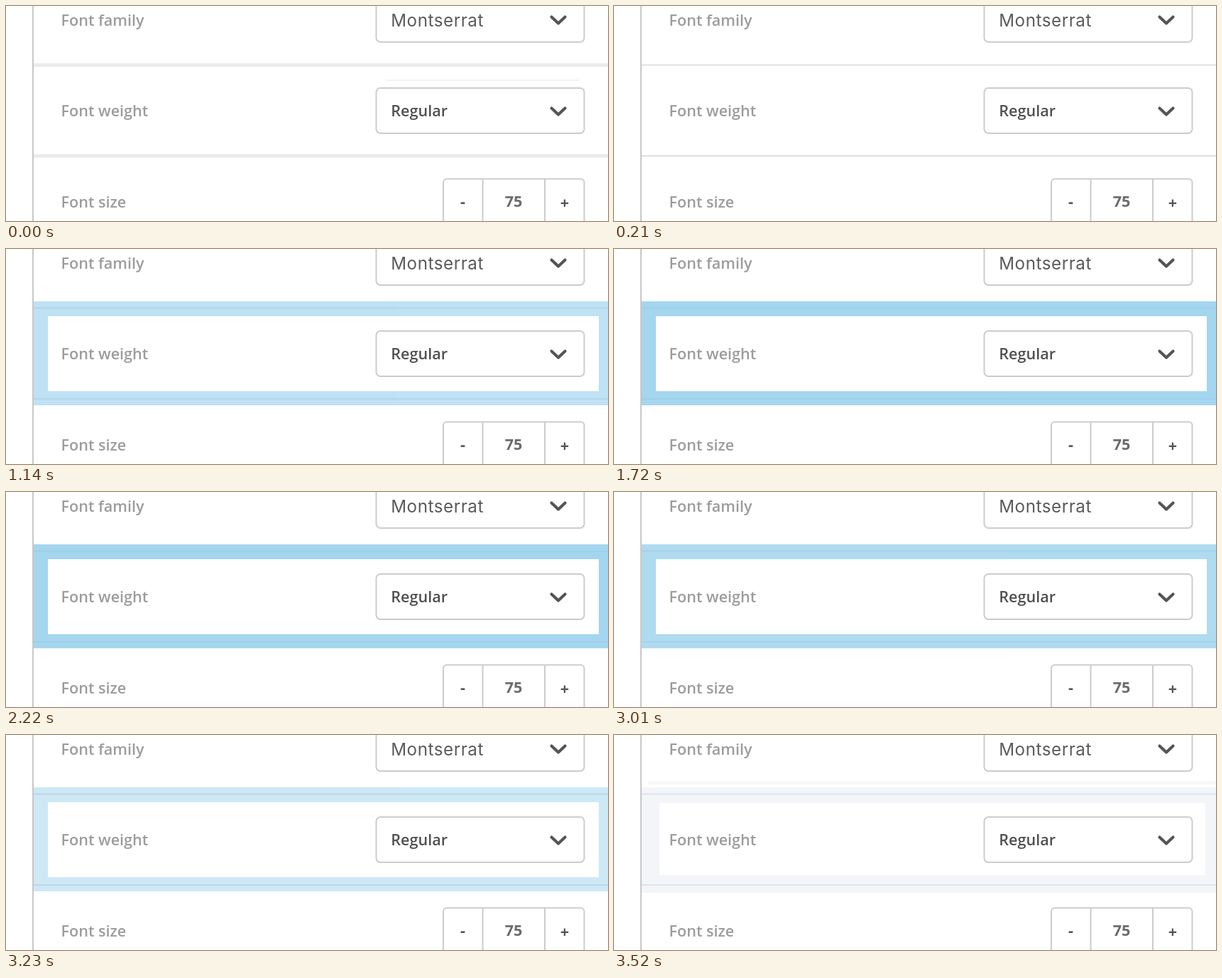
Animation, 848 px wide and 304 px high, one loop 3.9 s. Source, as an HTML page:

```html
<!DOCTYPE html>
<html lang="en">
<head>
<meta charset="utf-8">
<title>Font settings</title>
<style>
  html, body { margin: 0; width: 100%; height: 100%; overflow: hidden; background: #fff; }
  svg { display: block; width: 848px; height: 304px; }
  text { font: 600 21.6px "Open Sans", "Noto Sans", sans-serif; fill: #9c9c9c; }
  .value { fill: #505050; }
  .family { font: 400 24.2px Inter, sans-serif; letter-spacing: .55px; fill: #5a5a5a; }
  .number { font-weight: 700; fill: #6c6c6c; text-anchor: middle; }
  .sign { font-weight: 700; fill: #555; text-anchor: middle; }
  .box { fill: #fff; stroke: #ccc; stroke-width: 2; }
  .chevron { fill: none; stroke: #555; stroke-width: 4.2; stroke-linecap: round; stroke-linejoin: round; }
</style>
</head>
<body>
<svg viewBox="0 0 848 304">
  <path d="M38 0V304" stroke="#c8c8c8" stroke-width="2"/>
  <g id="rules" fill="none" stroke="#e0e0e0" stroke-width="2">
    <path d="M39 83.5H848M39 212H848"/>
  </g>
  <path id="trace" d="M536 105H808" stroke="#f3f3f3" stroke-width="2"/>
  <path id="glow" fill="#8ecceb" fill-rule="evenodd" d="M39 74H848V221H39ZM59 95V201H835V95Z"/>
  <path id="haze" fill="#f3f5f8" fill-rule="evenodd" d="M39 74H848V223H39ZM64 96V198H833V96Z"/>
  <path id="hazeRules" d="M39 83.5H848M39 212H848" stroke="#d9e5ed" stroke-width="2"/>
  <path id="hazeEdge" d="M48 67.5H848" stroke="#f8f8f8" stroke-width="5"/>

  <text x="77.5" y="28">Font family</text>
  <text x="77.5" y="156">Font weight</text>
  <text x="77.5" y="284.5">Font size</text>

  <rect class="box" x="521.5" y="-13" width="293" height="64" rx="6"/>
  <text class="family" x="542.2" y="28.5">Montserrat</text>
  <path class="chevron" d="M768.5 15.500L778 24.500L787.500 15.500"/>

  <rect class="box" x="521.5" y="116" width="293" height="64" rx="6"/>
  <text class="value" x="542.2" y="156">Regular</text>
  <path class="chevron" d="M768.5 144.500L778 153.500L787.500 144.500"/>

  <rect class="box" x="616" y="244.5" width="198.5" height="80" rx="5"/>
  <path d="M671.5 245V304M759 245V304" stroke="#ccc" stroke-width="2"/>
  <text class="sign" x="643.5" y="284">-</text>
  <text class="number" x="715" y="284">75</text>
  <text class="sign" x="787" y="285.5">+</text>
</svg>
<script>
  const LOOP = 3900;

  // Each step is [time, value] and holds until the next one.
  function hold(id, property, steps) {
    const frames = steps.map(([time, value]) =>
      ({ offset: time / LOOP, [property]: value, easing: 'steps(1, end)' }));
    frames.push({ offset: 1, [property]: steps.at(-1)[1] });
    document.getElementById(id).animate(frames, { duration: LOOP, iterations: Infinity });
  }

  const strength = [
    [0, 0],
    [930, .32], [1000, .45], [1070, .58], [1140, .71], [1210, .82], [1290, .92], [1360, 1],
    [3010, .88], [3090, .76], [3160, .65], [3230, .54], [3300, .43], [3370, .33], [3450, .23],
    [3520, 0]
  ];
  hold('glow', 'opacity', strength.map(([time, value]) => [time, value * .8]));
  for (const id of ['haze', 'hazeRules', 'hazeEdge'])
    hold(id, 'opacity', [[0, 0], [3520, 1]]);

  hold('rules', 'strokeWidth', [[0, '5px'], [60, '4px'], [130, '3px'], [210, '2px']]);
  hold('rules', 'stroke', [[0, '#ebebeb'], [60, '#e8e8e8'], [130, '#e4e4e4'], [210, '#e0e0e0']]);
  hold('trace', 'opacity', [[0, 1], [60, 0]]);
</script>
</body>
</html>
```
